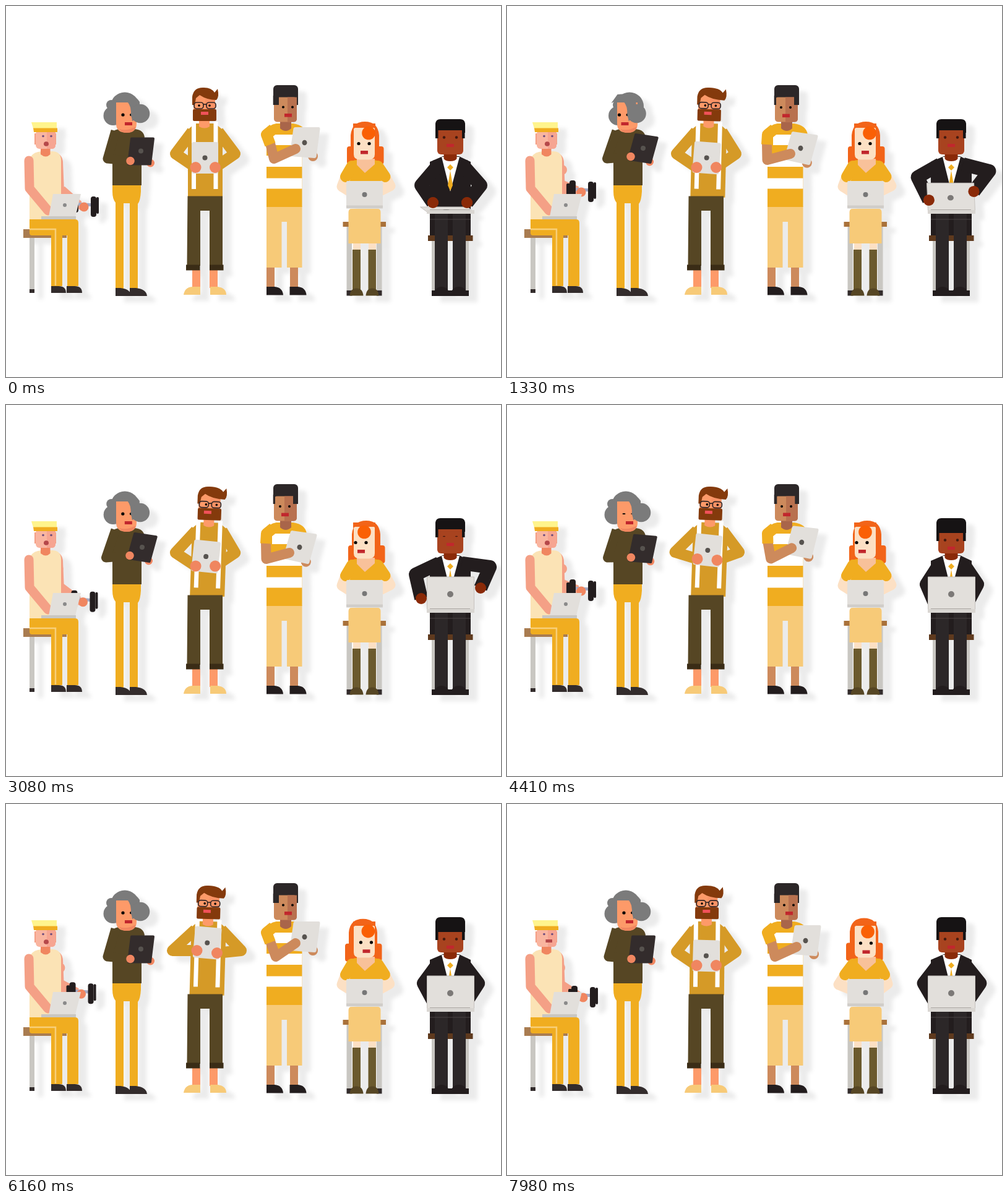
Animation of 800 by 600 pixels, one loop 8000 ms. Source, as an HTML page:

```html
<!DOCTYPE html>
<html lang="en">
<head>
<meta charset="utf-8">
<title>People with laptops</title>
<style>
  html, body { margin: 0; width: 100%; height: 100%; overflow: hidden; background: #fff; }
  svg { display: block; width: 100vw; height: 100vh; }
  #people { filter: drop-shadow(14px 10px 3px rgba(0, 0, 0, .08)); }
  polyline { fill: none; stroke-linejoin: round; }
  .gold { fill: #f0ad20; } .cream { fill: #f7ca78; } .olive { fill: #564624; }
  .lid { fill: #e2dfdb; } .dark { fill: #332c2c; } .black { fill: #231d1e; }
  .steel { fill: #c9c7c2; } .red { fill: #c1272d; } .dot { fill: #57534f; }
  .pink { fill: #f4a086; } .peach { fill: #fd9a69; } .coral { fill: #f08660; }
  .tan { fill: #cd8a5c; } .pale { fill: #fce0c4; } .brown { fill: #843a0c; }
  .grey { fill: #7b7b7b; } .orange { fill: #f26419; } .umber { fill: #8a2a08; }
</style>
</head>
<body>
<svg viewBox="0 0 800 600" preserveAspectRatio="none">
<g id="people">

  <!-- Weightlifter -->
  <g>
    <path fill="#a97c50" d="M28 361h70v14H28z"/>
    <path class="steel" d="M38 375h8v83h-8z"/><path class="dark" d="M38 458h8v6h-8z"/>
    <path class="pink" d="M78 237Q91 239 92 252L94 300H78z"/>
    <circle id="bicep" class="pink" cy="265" r="8"/>
    <polygon id="forearm" class="pink"/>
    <line id="bar" stroke="#a5aac4" stroke-width="5"/>
    <g id="plateL"><rect class="black" x="-8" y="-9" width="6" height="20" rx="2"/><rect class="black" x="-3" y="-14" width="10" height="28" rx="4"/></g>
    <circle id="fist" class="coral" r="7.5"/>
    <g id="plateR"><rect class="black" x="-6" y="-14" width="9" height="33" rx="4"/><rect class="black" x="3" y="-13" width="4" height="27" rx="2"/></g>
    <path fill="#fbe3b5" d="M38 345V248Q42 236 58 235H76Q89 236 89 250V345z"/>
    <path class="gold" d="M38 345H112Q117 345 117 351V453H99V371H91V453H73V371H42Q38 371 38 367z"/>
    <path d="M38 361H80V452" fill="none" stroke="#f8cf79" stroke-width="2.5"/>
    <path class="dark" d="M73 453h12q12 0 12 11h-24zM98 453h13q12 0 12 11H98z"/>
    <path class="coral" d="M56 229h15.500v11q-7 7-15.500 0z"/>
    <path class="pink" d="M46 206h4v18h-4zM78 206h3v18h-3z"/>
    <rect x="48" y="201" width="32" height="30" rx="6" fill="#f9b5a0"/>
    <path d="M66 204H80V225Q80 231 74 231H66z" fill="#f6a592"/>
    <path fill="#fff48d" d="M41 188H82V198H44z"/><path class="gold" d="M44 197.500H83V204H45z"/>
    <g fill="#71507f"><circle cx="60" cy="210.500" r="1.800"/><circle cx="73" cy="210.500" r="1.800"/></g>
    <ellipse id="mouthOpen" cx="65" cy="223" rx="4" ry="3.800" fill="#b5484a"/>
    <rect id="mouthFlat" x="62.500" y="219" width="10.500" height="5" fill="#b5484a"/>
    <polyline points="37 250 38 295 68 331" stroke="#f4a086" stroke-width="15" stroke-linecap="round"/>
    <path class="lid" d="M76 304H121L112 341H69z"/><path class="steel" d="M57 340h56v5H57z"/>
    <circle cx="95" cy="322" r="3" fill="#8a8a8a"/>
  </g>

  <!-- Grey-haired reader -->
  <g>
    <circle id="handR2" class="coral" r="6.500"/>
    <path class="gold" d="M172 290H218V300Q217 316 213 320V458H200V319H190V458H177V318Q172 312 172 300z"/>
    <path class="dark" d="M177 456h8q17 2 17 13h-25zM200 456h10q17 2 18 13h-28z"/>
    <g class="grey"><circle id="curlL" cy="177.500" r="15.500"/><circle id="curlBump" cy="160" r="8"/><ellipse id="curlTop" cy="162" rx="23" ry="22.500"/></g>
    <path class="olive" d="M172 290V206Q174 199 185 199H208Q222 200 224 212L219 222V290z"/>
    <polyline id="arm2" stroke="#564624" stroke-width="15"/>
    <path class="peach" d="M178 156H211V190Q211 205 195 205Q178 205 178 190z"/>
    <path class="coral" d="M183 199Q195 203 210 195Q207 205 195 205Q187 205 183 199z"/>
    <g id="face2"><g id="eyes2"><circle cx="189" cy="176" r="2.600"/><circle cx="202" cy="176" r="2"/></g><rect class="red" x="192" y="188" width="12" height="5"/></g>
    <g id="fringe" class="grey"><path d="M176 157L190 151Q198 154 201 164L204 186L216 180V155Q206 140 186 143z"/><circle cx="217" cy="174" r="15.300"/></g>
    <g id="tablet2"><path class="dark" d="M-15-22H20Q22-22 22-20L17 21Q17 23 15 23H-20Q-22 23-22 21L-17-20Q-17-22-15-22z"/><circle class="dot" r="4"/></g>
    <circle id="handL2" class="coral" r="6.800"/>
  </g>

  <!-- Bearded man -->
  <g>
    <path class="peach" d="M301 427h13v29h-13zM329 427h13v29h-13z"/>
    <path class="cream" d="M287 467q2-13 16-13h11v13zM330 454h12q14 2 14 13h-26z"/>
    <g class="lean"><path fill="#d59a27" d="M294 309V200L305 190H338L350 200V309z"/></g>
    <path class="olive" d="M293.500 307.500H350V420H329V331H314V420H292.500z"/>
    <path fill="#3a2c16" d="M291 418.500h22.500v9H291zM329 418.500h22.500v9H329z"/>
    <polyline id="armL3" stroke="#d59a27" stroke-width="18"/><polyline id="armR3" stroke="#d59a27" stroke-width="18"/>
    <g class="lean">
      <path fill="#fff" d="M300 187h7v109h-7zM335.500 187h7v109h-7z"/>
      <path class="peach" d="M312 180h17v15q-8 5-17 0z"/>
      <rect class="peach" x="303" y="143" width="35" height="34" rx="3"/>
      <path class="coral" d="M322 150h16v20h-16z" opacity=".4"/>
      <path id="hair3" class="brown"/>
      <rect class="brown" x="302" y="167" width="38" height="19" rx="2"/>
      <rect id="mouth3" x="315" y="171" width="12" height="5" fill="#f0525a"/>
      <g fill="none" stroke="#332625" stroke-width="1.700"><rect x="304" y="156" width="15" height="10" rx="4"/><rect x="324" y="156" width="15" height="10" rx="4"/><path d="M319 159h5"/></g>
      <g id="eyes3"><circle cx="312" cy="161" r="1.800"/><circle cx="329" cy="161" r="1.800"/></g>
    </g>
    <g id="laptop3"><rect class="lid" x="-21.500" y="-25.500" width="43" height="51" rx="3"/><circle class="dot" r="4"/></g>
    <circle id="handL3" class="coral" r="9"/><circle id="handR3" class="coral" r="9"/>
  </g>

  <!-- Striped shirt -->
  <g>
    <path class="tan" d="M421 422h13v33h-13zM459 422h13v33h-13z"/>
    <path class="black" d="M421 454h13q13 1 14 13.500h-27zM458.500 454h13q13 1 14 13.500h-27z"/>
    <path class="cream" d="M421 324H478.500V423H454V349H445.500V423H421z"/>
    <path class="gold" d="M421 325V202Q424 192 437 190H464Q484 193 486 208L478.500 214V325z"/>
    <path fill="#fff" d="M430 208h48.500v17H430zM421 242h57.500v18H421zM421 278.500h57.500V295.500H421z"/>
    <path d="M443 183h18v15q-9 8-18 0z" fill="#a9654a"/>
    <rect x="432" y="128" width="40" height="34" rx="6" fill="#2c2728"/>
    <rect class="tan" x="433" y="147.500" width="37" height="40" rx="5"/>
    <path id="shade4" fill="#b8714f"/>
    <rect id="burnL" x="431.700" y="145" height="15" fill="#2c2728"/><rect id="burnR" y="145" height="15" fill="#2c2728"/>
    <g id="face4"><circle cx="448" cy="163.500" r="2"/><circle cx="463" cy="163.500" r="2"/><rect class="red" x="450" y="174" width="12" height="5.500"/></g>
    <g id="tablet4"><circle class="tan" cx="13.500" cy="22" r="8"/><path class="lid" d="M-15-25H23Q25-25 25-22L19 23Q18 25 16 25L-22 22Q-24 22-24 20L-18-23Q-17-25-15-25z"/><ellipse class="dot" rx="4" ry="4.300"/></g>
    <polyline id="arm4" stroke="#cd8a5c" stroke-width="16" stroke-linecap="round"/>
    <polyline id="sleeve4" stroke="#f0ad20" stroke-width="18"/>
  </g>

  <!-- Red-haired woman -->
  <g>
    <path fill="#a9713a" d="M544.500 349h69.500v8h-69.500z"/>
    <path class="steel" d="M550.500 357h8.500v103h-8.500zM599 357h8.500v103H599z"/>
    <path class="dark" d="M550.500 460h9v8.500h-9zM599 460h8.500v8.500H599z"/>
    <path class="pale" d="M561 383h12v12h-12zM586 383h12v12h-12z"/>
    <path fill="#6b5a2e" d="M560 394h13v66h-13zM585.500 394h12.500v66h-12.500z"/>
    <path class="olive" d="M555.500 468.500q1-12 11-12t11 12zM581.500 468.500q1-12 10.500-12t10.500 12z"/>
    <g id="hair5" class="orange"><rect x="551" y="227" width="59.500" height="29" rx="4"/><path d="M557 230V209Q559 187 580 187T603 209V230z"/></g>
    <path class="gold" d="M553 290V258Q558 249 567 249H594Q602 249 607 258V290z"/>
    <polyline id="foreL5" stroke="#fce0c4" stroke-width="17"/><polyline id="foreR5" stroke="#fce0c4" stroke-width="17"/>
    <polyline id="upL5" stroke="#f0ad20" stroke-width="18" stroke-linecap="round"/><polyline id="upR5" stroke="#f0ad20" stroke-width="18" stroke-linecap="round"/>
    <path fill="#f8c19a" d="M567 247H596V256L580 270L567 257z"/>
    <path class="pale" d="M562 197H596V240Q596 248.500 586 248.500H572Q562 248.500 562 240z"/>
    <path class="orange" d="M561 199Q567 194 580 194T597 199V190H561z"/>
    <circle id="swoosh" cy="205.500" r="10.800" fill="#fa6005"/>
    <g id="face5"><circle cx="570" cy="222.500" r="2.600"/><circle cx="587" cy="222.500" r="2.600"/><rect class="red" x="573" y="234" width="12" height="5.500"/></g>
    <rect class="lid" x="550" y="283" width="59" height="44" rx="2"/><path class="steel" d="M550 322.500h59v5h-59z" opacity=".7"/>
    <circle cx="579.500" cy="305" r="4" fill="#777"/>
    <path class="cream" d="M553.500 333Q554 328 558 328H601Q605 328 605.500 333V384H553.500z"/>
  </g>

  <!-- Man in a suit -->
  <g>
    <path class="steel" d="M688 380h5v80h-5zM743 380h5v80h-5z"/>
    <path class="black" d="M685 252L706 243H732L751 252V371H685z"/>
    <path fill="#5f3a1e" d="M682 371h72.500v9H682z"/>
    <path fill="#2c2728" d="M693 336h21v128h-21zM722 336h21v128h-21z"/>
    <path fill="#4a4544" d="M685 344.500h66v1h-66z"/>
    <path class="black" d="M688 460h60v9h-60zM691 469q2-15 13-15t14 15q2-15 14-15t13 15z"/>
    <polyline id="armL6" stroke="#231d1e" stroke-width="22"/><polyline id="armR6" stroke="#231d1e" stroke-width="22"/>
    <circle class="handL6 umber" r="9"/><circle class="handR6 umber" r="9"/>
    <path fill="#fff" d="M704 244H733L718 300z"/>
    <path class="gold" d="M718 256l5 5-5 5-5-5zM718 266l4 24-4 9-4-9z"/>
    <path class="umber" d="M707.500 236H728.500V247Q726 251 718 251T707.500 247z"/>
    <path fill="#161314" d="M694 190Q695 183 702 183H734Q741 183 742 190V205H694z"/>
    <rect x="697" y="196" width="42" height="44" rx="6" fill="#a8431f"/>
    <g id="cap6" fill="#161314"><path id="capFront"/><path d="M694 195h4.500v19h-4.500zM737 195h4.500v19H737z"/></g>
    <g id="face6"><g id="eyes6" fill="#43190f"><circle cx="708" cy="212.500" r="2.200"/><circle cx="728" cy="212.500" r="2.200"/></g><rect class="red" x="712" y="223" width="12" height="5"/></g>
    <polygon id="lid6" class="lid" stroke="#c6c2be"/>
    <path d="M680 330h77v6h-77z" fill="#d9d6d2"/><path d="M685 329.500h65" stroke="#aaa6a2"/>
    <ellipse id="dot6" rx="5" fill="#7c7977"/>
    <g id="front6"><circle class="handL6 umber" r="9"/><circle class="handR6 umber" r="9"/></g>
  </g>
</g>
</svg>
<script>
const LOOP = 8000, STEP = 70;
const $ = id => document.getElementById(id);
const clamp = x => Math.min(1, Math.max(0, x));
const smooth = x => { x = clamp(x); return x * x * (3 - 2 * x); };
const mix = (a, b, k) => Array.isArray(a) ? a.map((v, i) => mix(v, b[i], k)) : a + (b - a) * k;

// Eased step from 0 to 1, and the same with an eased return
const rise = (t, from, to) => smooth((t - from) / (to - from));
const pulse = (t, up, top, down, end) => rise(t, up, top) - rise(t, down, end);

function set(id, attrs) {
  for (const name in attrs) $(id).setAttribute(name, attrs[name]);
}
const points = (id, ...list) => set(id, { points: list.flat().join(' ') });
const place = (id, x, y, turn = 0) => set(id, { transform: `translate(${x} ${y}) rotate(${turn})` });
const show = (id, on) => set(id, { visibility: on ? 'visible' : 'hidden' });
const blink = (id, y, closed) => set(id, { transform: `translate(0 ${y}) scale(1 ${closed ? .35 : 1}) translate(0 ${-y})` });
const each = (selector, value) => document.querySelectorAll(selector).forEach(el => el.setAttribute('transform', value));

function lifter(t) {
  const phase = t % 2800 / 2800;
  const lift = smooth(Math.min(phase, 1 - phase) / .3);
  const hand = mix([126, 325], [120, 301], lift);
  const left = [hand[0] - 16, hand[1] - 5], right = [hand[0] + 17, hand[1] - 3];
  const elbow = mix([95, 292], [89, 281], lift);
  points('forearm', [82, 296], elbow, [hand[0] - 4, hand[1] - 9], [hand[0] - 4, hand[1] + 6], [88, 312]);
  set('bicep', { cx: 83 + 6 * lift });
  set('bar', { x1: left[0], y1: left[1], x2: right[0], y2: right[1] });
  place('plateL', ...left);
  place('plateR', ...right);
  place('fist', ...hand);
  const flat = t > 6650;
  show('mouthOpen', !flat);
  show('mouthFlat', flat);
}

function reader(t) {
  const turn = pulse(t, 400, 1250, 1900, 3200);
  const raise = pulse(t, 200, 1250, 3600, 5400);
  set('curlL', { cx: 173 + 6.5 * turn });
  set('curlBump', { cx: 170 + 9 * turn });
  set('curlTop', { cx: 192 + 6 * turn });
  place('fringe', -7.5 * turn, 0);
  place('face2', -7.5 * turn, 0);
  blink('eyes2', 176, Math.abs(t - 4410) < 110);
  place('tablet2', 218 + 2 * raise, 234.5 - 4.5 * raise, 8.5 * raise);
  place('handL2', 201 - raise, 250.5 - 7 * raise);
  place('handR2', 233.5 - 3 * raise, 254 - 2 * raise);
  points('arm2', [177, 202], [164 - 2.5 * raise, 247], [197, 250 - 6 * raise]);
}

function bearded(t) {
  const lean = 2 * pulse(t, 0, 2000, 4800, 9600);
  const raise = pulse(t, 2800, 6000, 6160, 8000);
  const tail = Math.min(5, lean * 8), shift = lean * 3;
  each('.lean', `rotate(${lean} 322 400)`);
  set('hair3', { d: `M301 160V147Q303 131 320 132Q${332 + tail} 132 ${337 + tail} 140L${342 + tail} 134Q${345 + tail} 147 ${340 + tail} 152Q325 152 313 144L307 149L305 160z` });
  place('eyes3', 1.5 * lean, 0);
  place('mouth3', -1.5 * lean, 0);
  const left = [306.5 + 2 * raise, 261 - 24 * raise], right = [338 + 3 * raise, 261 - 20 * raise];
  points('armL3', [301 + shift, 203], [274 - 5 * raise, 239 - 2 * raise], left);
  points('armR3', [343 + shift, 203], [370 + 10 * raise, 239 - 2 * raise], right);
  place('handL3', ...left);
  place('handR3', ...right);
  place('laptop3', 321.5 + .8 * lean + 2.5 * raise, 245.5 - 21 * raise, 3 * lean);
}

function striped(t) {
  const turn = pulse(t, 200, 1250, 3900, 5600);
  const lift = pulse(t, 3200, 4300, 6300, 7300);
  const split = 455 - 5 * turn;
  place('face4', -5 * turn, .6 * turn);
  set('shade4', { d: `M${split} 147.500H470V182Q470 187.500 465 187.500H${split}z` });
  set('burnL', { width: 9.3 - 6 * turn });
  set('burnR', { x: 470 - 6 * turn, width: 2 + 6 * turn });
  place('tablet4', 482.5 - 8 * turn, 221 + 9 * turn - 6 * lift, 8 * turn);
  const cuff = 427 - 7 * turn;
  points('arm4', [cuff, 222], [433 - 12.5 * turn + 3 * lift, 247 + 2 * turn], [468 - 10 * turn, 231 + 8 * turn - 6 * lift]);
  points('sleeve4', [432, 199], [421, 208], [cuff, 224]);
}

function redhead(t) {
  const left = pulse(t, 1500, 2700, 4500, 5600);
  const right = rise(t, 4700, 5900), nod = rise(t, 5800, 7000);
  place('face5', 4 * right - 5 * left - 2.5 * nod, right + 1.5 * nod);
  place('hair5', 2 * left - 3 * right, -right - 1.5 * nod);
  set('swoosh', { cx: 586 - 7 * left - 3 * nod, cy: 205.5 + nod });
  const elbowL = 543 - 7 * rise(t, 7200, 7900), elbowR = 621 - 6 * nod;
  const sleeveL = mix(549, elbowL + 6, .4), sleeveR = mix(612.5, elbowR - 8.5, .4);
  points('foreL5', [sleeveL, 276], [elbowL, 292], [556, 300]);
  points('foreR5', [sleeveR, 276], [elbowR, 291], [603, 300]);
  points('upL5', [559, 259], [sleeveL, 276]);
  points('upR5', [601, 259], [sleeveR, 276]);
}

function suited(t) {
  const open = rise(t, 700, 1560);
  const spread = pulse(t, 700, 1560, 3300, 4300);
  const reach = pulse(t, 700, 2100, 3300, 4300);
  const typing = rise(t, 3300, 4300) * (4.5 + 2.5 * Math.cos((t - 4410) / 1365 * 2 * Math.PI));
  const dip = 6 * rise(t, 3200, 4200);
  place('face6', 0, dip);
  place('cap6', 0, dip);
  set('capFront', { d: `M694 ${191 - dip}H742V201H694z` });
  blink('eyes6', 212.5, Math.abs(t - 3080) < 110);
  const handL = [mix(690, 671, reach), mix(318, 313, spread)];
  const handR = [mix(745, 767, reach), mix(318, 296, spread)];
  points('armL6', [700, 256], [671 - 9 * spread + typing, 290 - 16 * spread], handL);
  points('armR6', [737, 256], [767 + 15 * spread - typing, 290 - 28 * spread], handR);
  each('.handL6', `translate(${handL})`);
  each('.handR6', `translate(${handR})`);
  const top = mix(325, 278, open), skew = 11 * (1 - open);
  points('lid6', [680.5 - skew, top], [756.5 - skew, top], [756.5, 333], [680.5, 333]);
  set('dot6', { cx: 718 - skew * .6, cy: (top + 334) / 2, ry: 5 * clamp((330 - top) / 50) });
  show('front6', t < 1600);
}

const start = performance.now();
function tick() {
  const t = Math.floor((performance.now() - start) % LOOP / STEP) * STEP;
  [lifter, reader, bearded, striped, redhead, suited].forEach(person => person(t));
  requestAnimationFrame(tick);
}
tick();
</script>
</body>
</html>
```
